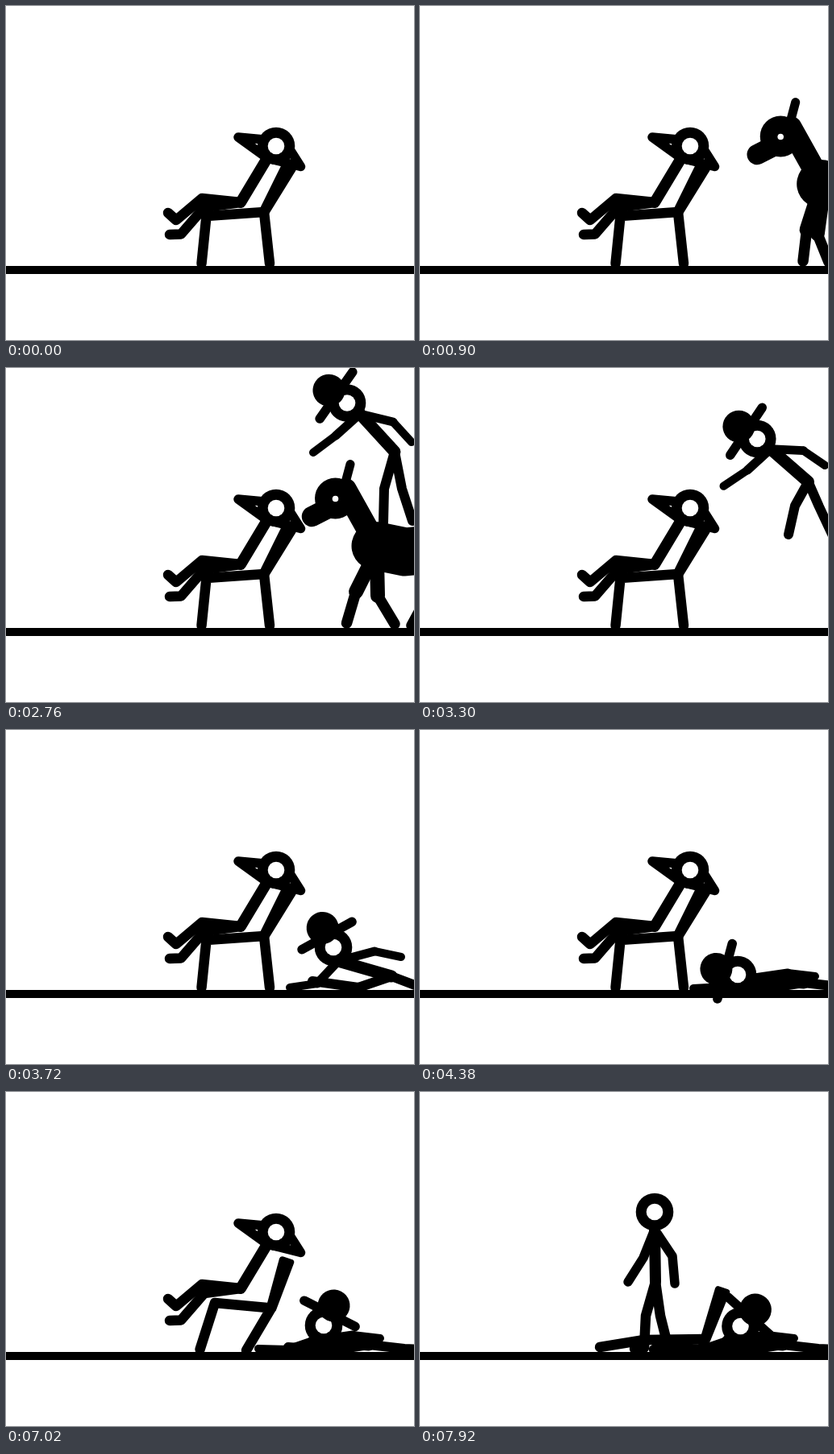
These frames come from a looping animation (506x415 px, 8 s). An HTML page with a canvas:

```html
<!DOCTYPE html>
<html lang="en">
<head>
<meta charset="utf-8">
<title>Nap on a chair</title>
<style>
  html, body { margin: 0; width: 100%; height: 100%; overflow: hidden; background: #fff; }
  canvas { display: block; }
</style>
</head>
<body>
<canvas id="stage" width="506" height="415"></canvas>
<script>
const ctx = document.getElementById('stage').getContext('2d');
const LOOP = 8000, STEP = 60;

// ---- drawing helpers ----
function line(width, ...pts) {
  ctx.lineWidth = width;
  ctx.beginPath();
  pts.forEach(p => ctx.lineTo(p[0], p[1]));
  ctx.stroke();
}

// A bar whose width changes from one end to the other.
function taper(a, b, wa, wb) {
  const n = Math.atan2(b[1] - a[1], b[0] - a[0]) + Math.PI / 2;
  const side = (p, w) => [p[0] + Math.cos(n) * w / 2, p[1] + Math.sin(n) * w / 2];
  ctx.fillStyle = '#000';
  ctx.lineWidth = 8;
  ctx.beginPath();
  for (const p of [side(a, wa - 8), side(b, wb - 8), side(b, 8 - wb), side(a, 8 - wa)]) ctx.lineTo(...p);
  ctx.closePath();
  ctx.fill();
  ctx.stroke();
}

function disc(x, y, r, color = '#000') {
  ctx.fillStyle = color;
  ctx.beginPath();
  ctx.arc(x, y, r, 0, Math.PI * 2);
  ctx.fill();
}

function head([x, y]) {
  disc(x, y, 23.3);
  disc(x, y, 10.3, '#fff');
}

// ---- keyframe helpers ----
const mix = (a, b, k) => a + (b - a) * k;

function mixPose(a, b, k) {
  const out = {};
  for (const part in a) out[part] = a[part].map((v, i) => mix(v, b[part][i], k));
  return out;
}

function at(keys, t) {
  if (t <= keys[0][0]) return keys[0][1];
  for (let i = 1; i < keys.length; i++) {
    const [t0, a] = keys[i - 1], [t1, b] = keys[i];
    if (t < t1) return mixPose(a, b, (t - t0) / (t1 - t0));
  }
  return keys[keys.length - 1][1];
}

function shift(pose, dx) {
  const out = {};
  for (const part in pose) {
    const [x, y] = pose[part];
    out[part] = part === 'tilt' ? [x] : [x + dx, y];
  }
  return out;
}

// ---- rider ----
const seated = {
  tilt: [0], head: [512, 108], neck: [516, 130], hip: [520, 192],
  elbowA: [502, 160], handA: [478, 180], elbowB: [530, 165], handB: [520, 185],
  kneeA: [498, 230], footA: [496, 276], kneeB: [510, 230], footB: [508, 276]
};
const standing = {
  tilt: [-24], head: [462.5, 47], neck: [470, 67], hip: [486, 128],
  elbowA: [453, 102], handA: [432, 132], elbowB: [501, 96], handB: [513, 130],
  kneeA: [475, 175], footA: [481, 197], kneeB: [495, 175], footB: [511, 195]
};
const leaning = {
  tilt: [-30], head: [447, 40], neck: [454, 60], hip: [483, 114],
  elbowA: [432, 90], handA: [410, 112], elbowB: [490, 85], handB: [508, 115],
  kneeA: [471, 160], footA: [472, 194], kneeB: [494, 160], footB: [508, 192]
};
const reaching = { ...leaning, tilt: [-50], head: [432, 42], elbowA: [418, 82], handA: [383, 102] };
const bowing = {
  tilt: [-55], head: [423, 43.5], neck: [439, 57], hip: [482, 104],
  elbowA: [409, 84], handA: [381, 105], elbowB: [480, 67], handB: [503, 92],
  kneeA: [469, 150], footA: [468, 192], kneeB: [491, 150], footB: [504, 190]
};
const hanging = {
  ...bowing, tilt: [-60], head: [420, 62], neck: [438, 74], hip: [482, 118],
  elbowA: [409, 100], handA: [380, 122], elbowB: [478, 78], handB: [504, 98]
};
const landing = {
  tilt: [-29], head: [406, 270], neck: [412, 287], hip: [478, 306],
  elbowA: [386, 315], handA: [352, 320], elbowB: [457, 275], handB: [490, 282],
  kneeA: [437, 320], footA: [380, 312], kneeB: [520, 322], footB: [560, 322]
};
const flat = {
  tilt: [3], head: [413.5, 288], neck: [408, 309], hip: [476, 314],
  elbowA: [375, 319], handA: [339, 321], elbowB: [456, 302], handB: [490, 306],
  kneeA: [430, 321], footA: [376, 317], kneeB: [520, 319], footB: [560, 321]
};
const sprawled = { ...flat, tilt: [-29], head: [409, 288] };
const faceDown = { ...flat, tilt: [-75], head: [394, 304] };
const peeking = { ...flat, tilt: [27], head: [420, 290] };
const grabbing = { ...peeking, elbowA: [376, 292], handA: [350, 312] };
const crawled = { ...shift(peeking, -26), elbowA: [364, 306], handA: [347, 318] };
const pushing = { ...crawled, elbowA: [350, 320], handA: [313, 319] };
const done = { ...pushing, tilt: [42], head: [397.5, 291], handA: [290, 320] };

const riderKeys = [
  [1320, seated], [1620, standing], [1740, leaning], [1920, leaning],
  [2400, reaching], [2580, reaching], [2760, bowing], [3060, hanging], [3240, hanging],
  [3720, landing], [3840, sprawled], [4020, sprawled], [4380, faceDown], [4980, faceDown],
  [5400, flat], [5520, peeking], [5700, peeking], [6180, grabbing], [6300, grabbing],
  [6480, crawled], [6720, crawled], [7020, pushing], [7560, done]
];

function drawRider(p) {
  line(12, p.hip, p.kneeA, p.footA);
  line(12, p.hip, p.kneeB, p.footB);
  line(15, p.neck, p.hip);
  for (const [elbow, hand] of [[p.elbowA, p.handA], [p.elbowB, p.handB]]) {
    line(11, p.neck, elbow);
    line(10, elbow, hand);
  }
  head(p.head);
  ctx.save();
  ctx.translate(...p.head);
  ctx.rotate(p.tilt[0] * Math.PI / 180);
  line(11.5, [-35.5, -16.5], [35.5, -16.5]);
  disc(0, -27.5, 20);
  ctx.restore();
}

// ---- horse ----
const horseKeys = [
  [420, { x: [142] }], [1080, { x: [0] }], [2760, { x: [0] }], [3060, { x: [150] }]
];

function drawHorse(dx) {
  const swing = Math.sin(dx / 70 * Math.PI) * 14;
  const leg = (top, knee, foot, s) => {
    const bend = [knee[0] + s / 2, knee[1]];
    line(18, top, bend);
    line(13.5, bend, [foot[0] + s, foot[1]]);
  };
  ctx.save();
  ctx.translate(dx, 0);
  leg([453, 240], [434, 278], [422.5, 317], swing);
  leg([460, 240], [461, 283], [482, 318], -swing);
  leg([545, 240], [522, 285], [503, 320], -swing);
  leg([555, 240], [560, 285], [570, 320], swing);
  line(60, [458.5, 221], [495, 228.5], [550, 223]);
  line(28, [421, 151], [450, 203]);
  line(11, [421, 142], [427, 119.5]);
  disc(408.5, 162, 25.5);
  line(25.5, [402, 173], [379.5, 184.5]);
  disc(408.5, 162.5, 3.8, '#fff');
  ctx.restore();
}

// ---- chair ----
const upright = { front: [242.5, 320], seatA: [248.5, 261], seatB: [320, 256], rear: [327, 320], back: [351, 200] };
const tipped = { front: [240.5, 320], seatA: [259, 262], seatB: [329, 268.5], rear: [298, 321], back: [348, 210] };
const collapsed = { front: [223, 317], seatA: [278, 308], seatB: [354, 307], rear: [290, 320], back: [375, 247] };
const chairKeys = [[6720, upright], [7020, tipped], [7560, collapsed]];

function drawChair(p) {
  line(12.5, p.front, p.seatA, p.seatB, p.rear);
  taper(p.seatB, p.back, 13, 19);
}

// ---- napping man ----
const napping = {
  head: [335, 174], neck: [324, 189], hip: [291, 244],
  elbowA: [288, 163], handA: [320, 166], elbowB: [365.5, 199.5], handB: [350, 175],
  kneeA: [243, 239], ankleA: [211, 266], toeA: [201, 257],
  kneeB: [246, 250], ankleB: [217, 283.5], toeB: [203, 284]
};
const crouching = {
  head: [312, 190], neck: [306, 211], hip: [290, 272],
  elbowA: [286, 238], handA: [268, 266], elbowB: [322, 242], handB: [326, 276],
  kneeA: [260, 275], ankleA: [272, 316], toeA: [258, 318],
  kneeB: [270, 280], ankleB: [294, 316], toeB: [280, 318]
};
const upAgain = {
  head: [291, 149], neck: [291, 171], hip: [292, 236],
  elbowA: [277, 206], handA: [258, 236], elbowB: [313, 204], handB: [316, 238],
  kneeA: [280, 278], ankleA: [278, 318], toeA: [266, 319],
  kneeB: [298, 278], ankleB: [306, 310], toeB: [294, 318]
};
const manKeys = [[7020, napping], [7560, crouching], [7920, upAgain]];

function drawMan(p) {
  line(12.5, p.hip, p.kneeA, p.ankleA, p.toeA);
  line(12.5, p.hip, p.kneeB, p.ankleB, p.toeB);
  line(14, p.neck, p.hip);
  line(11.5, p.neck, p.elbowA, p.handA);
  line(11.5, p.neck, p.elbowB, p.handB);
  head(p.head);
}

// ---- scene ----
function draw(time) {
  const t = Math.floor(time / STEP) * STEP;
  ctx.fillStyle = '#fff';
  ctx.fillRect(0, 0, 506, 415);
  ctx.fillStyle = ctx.strokeStyle = '#000';
  ctx.lineCap = ctx.lineJoin = 'round';
  ctx.fillRect(0, 323, 506, 10);

  const dx = at(horseKeys, t).x[0];
  if (t < 3060) drawHorse(dx);
  const rider = at(riderKeys, t);
  drawRider(t < 1080 ? shift(rider, dx) : rider);
  drawChair(at(chairKeys, t));
  drawMan(at(manKeys, t));
}

const start = performance.now();
function tick() {
  draw(Math.min((performance.now() - start) % LOOP, 7979));
  requestAnimationFrame(tick);
}
tick();
</script>
</body>
</html>
```
